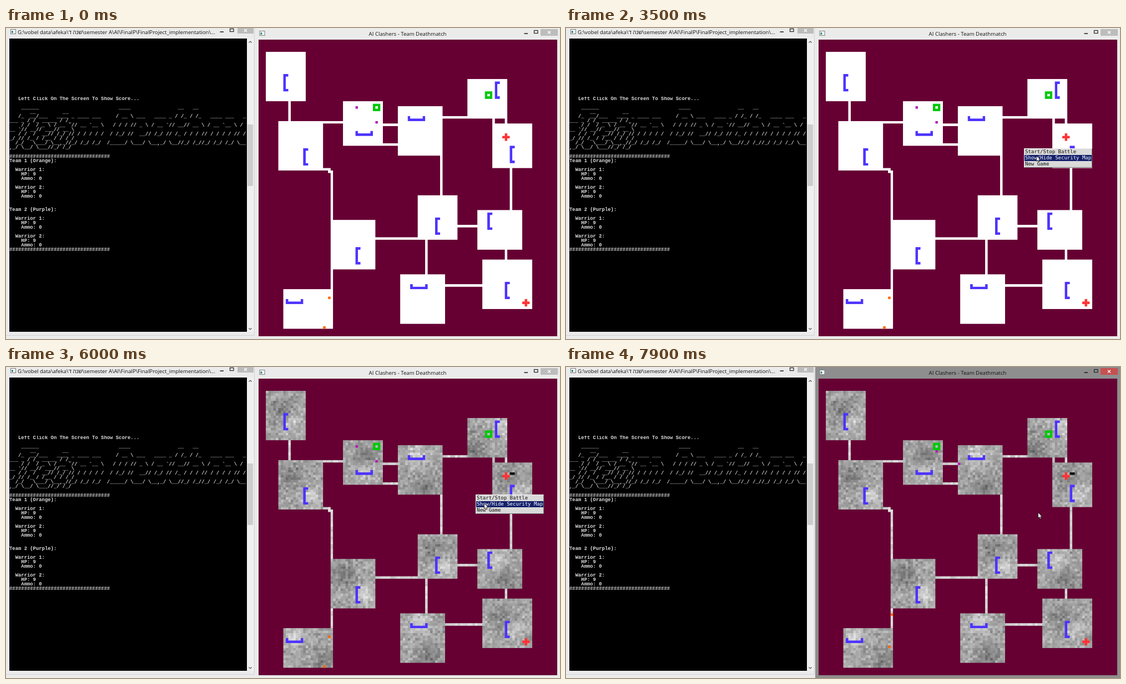
An HTML page with a canvas that plays this animation: 998x561 px, repeating every 8 s.

```html
<!DOCTYPE html>
<html lang="en">
<head>
<meta charset="utf-8">
<title>Team Deathmatch</title>
<style>
  html, body { margin: 0; width: 100%; height: 100%; overflow: hidden; background: #ebebeb; }
  #stage { position: relative; width: 998px; height: 561px; overflow: hidden; }
  #stage > * { position: absolute; }
  #chrome { left: 0; top: 0; }
  #chrome text { font: 9.65px "Open Sans", "Noto Sans", sans-serif; fill: #111; }
  #console {
    left: 6px; top: 124px; width: 428px; margin: 0; overflow: hidden;
    font: bold 8.9px/8px "Liberation Mono", monospace; color: #dcdcdc;
  }
  #map { left: 455px; top: 21px; }
  #menu {
    width: 121px; height: 33px; background: #dadada;
    border: 1px solid #eee; border-right-color: #777; border-bottom-color: #777;
    font: 9px/11px "DejaVu Sans Mono", monospace; color: #111; white-space: pre;
  }
  #menu div { height: 11px; padding-left: 1px; }
  #menu .on { background: #14206c; color: #fff; }
  #cursor { left: 0; top: 0; overflow: visible; }
</style>
</head>
<body>
<div id="stage">
  <svg id="chrome" width="998" height="561">
    <rect width="998" height="561" fill="#ebebeb"/>
    <path d="M0 554.5H447.5V0" fill="none" stroke="#d2d2d2"/>
    <rect x="6" y="19" width="428" height="529"/>
    <rect x="434" y="19" width="12" height="529" fill="#f0f0f0"/>
    <rect x="435" y="174" width="10" height="111" fill="#cdcdcd"/>
    <path d="M437.5 26.5l2.5-2.5 2.5 2.5M437.5 541.5l2.5 2.5 2.5-2.5" fill="none" stroke="#555" stroke-width="1.2"/>
    <text x="21" y="11">G:\vobel data\afeka\שנה ד\semester A\AI\FinalP\FinalProject_implementation\...</text>
    <rect id="frame" x="449" width="549" height="561"/>
    <text x="723.5" y="14" text-anchor="middle">AI Clashers - Team Deathmatch</text>
    <g id="buttons"></g>
  </svg>
  <pre id="console"></pre>
  <canvas id="map" width="538" height="535"></canvas>
  <div id="menu"><div>Start/Stop Battle</div><div>Show/Hide Security Map</div><div>New Game</div></div>
  <svg id="cursor" width="10" height="14">
    <path d="M.5 .5V10.5L2.8 8.4 4.4 12 6 11.3 4.5 7.9H7.5Z" fill="#fff" stroke="#111" stroke-width=".8"/>
  </svg>
</div>
<script>
const $ = id => document.getElementById(id);
const LOOP = 8000;
const FRAME = 100;

// Icon and buttons of a window; `right` is the right edge of its close button
const windowButtons = (left, right, y, w, h) => `
  <rect x="${left}" y="${y + 3.5}" width="9" height="8" fill="#fff" stroke="#777"/>
  <rect x="${left + 1.5}" y="${y + 6}" width="3" height="4" fill="#3c8f8a"/>
  <path d="M${right - 60.5} ${y + 8}h6.5" stroke="#222" stroke-width="1.6"/>
  <rect x="${right - 42.5}" y="${y + 2.5}" width="6.5" height="5" fill="none" stroke="#222" stroke-width="1.2"/>
  <rect class="close" x="${right - w}" y="${y}" width="${w}" height="${h}" fill="#bcbcbc"/>
  <path d="M${right - w / 2 - 2.5} ${y + h / 2 - 2.5}l5 5m0-5l-5 5" stroke="#fff" stroke-width="1.3"/>`;
$('buttons').innerHTML = windowButtons(8.5, 446, -1, 29, 11) + windowButtons(457, 994, 2, 31, 12);
const closeButton = document.querySelectorAll('.close')[1];

// Console text, wrapped at 80 columns
const banner = String.raw`
    ______                           ____                __   __                       __         __
   /_  __/___   ____ _ ____ ___     / __ \ ___   ____ _ / /_ / /_   ____ ___   ____ _ / /_ _____ / /_
    / /  / _ \ / __ '// __ '__ \   / / / // _ \ / __ '// __// __ \ / __ '__ \ / __ '// __// ___// __ \
   / /  /  __// /_/ // / / / / /  / /_/ //  __// /_/ // /_ / / / // / / / / // /_/ // /_ / /__ / / / /
  /_/   \___/ \__,_//_/ /_/ /_/  /_____/ \___/ \__,_/ \__//_/ /_//_/ /_/ /_/ \__,_/ \__/ \___//_/ /_/
`.replaceAll("'", '`').split('\n').slice(1, -1);
const warriorText = n => [`  Warrior ${n}:`, '    HP: 9', '    Ammo: 0'];
const teamText = (n, name) => [`Team ${n} (${name}):`, '', ...warriorText(1), '', ...warriorText(2)];
const rule = '#'.repeat(34);
$('console').textContent = [
  '   Left Click On The Screen To Show Score...', '',
  ...banner.flatMap(s => [s.slice(0, 80), s.slice(80)]), '',
  rule, ...teamText(1, 'Orange'), '', '', ...teamText(2, 'Purple'), rule
].join('\n');

// Map in grid cells. Each room holds one cover, open to the right '[' or upwards 'u'
const room = (x, y, w, h, kind, dx, dy) => ({ x, y, w, h, kind, cx: x + dx, cy: y + dy });
const rooms = {
  A: room(3, 5, 16, 20, '[', 7, 9),
  B: room(8, 33, 18, 20, '[', 10, 11),
  C: room(34, 25, 16, 18, 'u', 5, 12),
  D: room(56, 27, 18, 20, 'u', 4, 4),
  E: room(84, 16, 16, 16, '[', 11, 1),
  F: room(94, 34, 16, 18, '[', 7, 9),
  G: room(64, 63, 16, 18, '[', 7, 9),
  H: room(88, 69, 18, 16, '[', 4, 1),
  I: room(29, 73, 18, 20, '[', 10, 11),
  J: room(10, 101, 20, 16, 'u', 1, 4),
  K: room(57, 95, 18, 20, 'u', 4, 4),
  L: room(90, 89, 20, 20, '[', 9, 9)
};
// Straight corridors: the two rooms and the row or column they share
const links = {
  AB: [12], BC: [33], CD: [34, 42], DE: [31], EF: [94, 99], DG: [73], FH: [101],
  HL: [99], GH: [75], IG: [80], GK: [67], KL: [99], IJ: [29]
};
function corridor(a, b, at) {
  const right = a.x + a.w, bottom = a.y + a.h;
  return b.x >= right
    ? { x: right, y: at, w: b.x - right, h: 1 }
    : { x: at, y: bottom, w: 1, h: b.y - bottom };
}
const corridors = Object.entries(links).flatMap(([[a, b], places]) =>
  places.map(at => corridor(rooms[a], rooms[b], at)));
corridors.push({ x: 26, y: 52, w: 3, h: 1 }, { x: 28, y: 53, w: 1, h: 1 }, { x: 29, y: 53, w: 1, h: 20 });

const CELL = 8;
function block(ctx, color, x, y, w = 1, h = 1) {
  ctx.fillStyle = color;
  ctx.fillRect(x * CELL, y * CELL, w * CELL, h * CELL);
}
function noise(x, y) {
  const n = k => { const s = Math.sin(x * 127.1 + y * 311.7 + k * 74.7) * 43758.5453; return s - Math.floor(s); };
  return n(1) + n(2) + n(3) - 1.5;
}
const glow = (dx, dy, r) => Math.exp(-(dx * dx + dy * dy) / (r * r));

// Cells are light inside the cover and dark at the point mirrored through the room's centre
function roomShade(r, x, y) {
  const lx = r.cx + 3, ly = r.cy + (r.kind === '[' ? 3 : -.5);
  const sx = 2 * r.x + r.w - lx, sy = 2 * r.y + r.h - ly;
  return 164 + 42 * glow(x - lx, y - ly, 4) - 34 * glow(x - sx, y - sy, 5) + 30 * noise(x, y);
}
const grey = v => `rgb(${v} ${v} ${v})`;

function drawMap(secure) {
  const canvas = document.createElement('canvas');
  canvas.width = canvas.height = 120 * CELL;
  const ctx = canvas.getContext('2d');
  block(ctx, '#660033', 0, 0, 120, 120);

  const fillArea = (r, shade) => {
    if (!secure) return block(ctx, '#fff', r.x, r.y, r.w, r.h);
    for (let x = r.x; x < r.x + r.w; x++)
      for (let y = r.y; y < r.y + r.h; y++)
        block(ctx, grey(Math.min(232, shade(r, x, y))), x, y);
  };
  for (const c of corridors) fillArea(c, (r, x, y) => 210 + 20 * noise(x, y));
  for (const r of Object.values(rooms)) {
    fillArea(r, roomShade);
    const blue = '#4c33ff', upright = r.kind === '[';
    const [dx, dy] = upright ? [0, 6] : [6, 0];
    block(ctx, blue, r.cx, r.cy + !upright, dx + 1, dy + 1);
    for (const k of [0, 1]) block(ctx, blue, r.cx + k * dx, r.cy + k * dy, upright ? 2 : 1, 1);
  }
  if (secure) block(ctx, '#111', 101, 38, 2, 1);

  for (const [x, y] of [[46, 26], [91, 21]]) {
    block(ctx, '#00c80a', x, y, 3, 3);
    block(ctx, secure ? '#b8b8b8' : '#fff', x + 1, y + 1);
  }
  for (const [x, y] of [[98, 38], [106, 105]]) {
    block(ctx, '#ff3333', x, y + 1, 3, 1);
    block(ctx, '#ff3333', x + 1, y, 1, 3);
  }
  return canvas;
}
const plainMap = drawMap(false), secureMap = drawMap(true);

// Warriors walk one cell per step along their waypoints
const orange = '#ff6600', purple = '#b31ab3';
const warriors = [
  [orange, [[28, 104], [29, 104], [29, 95]]],
  [orange, [[26, 116], [28, 116], [28, 108]]],
  [purple, [[39, 27], [45, 27], [45, 29], [47, 29]]],
  [purple, [[47, 33], [47, 34], [56, 34]]]
];
const stepsAt = t => t < 6700 ? 0 : Math.floor((t - 6550) / 150) + 1;
function walk([[x, y], ...targets], steps) {
  for (const [tx, ty] of targets)
    for (; steps > 0 && (x !== tx || y !== ty); steps--) {
      x += Math.sign(tx - x);
      y += Math.sign(ty - y);
    }
  return [x, y];
}

// Pointer moves: start, end, destination
const moves = [
  [300, 900, 706, 222], [1000, 1400, 826, 217], [2000, 2400, 837, 223], [3200, 3500, 847, 230],
  [4300, 4600, 859, 250], [5900, 6200, 865, 236], [6600, 7900, 850, 262]
];
function pointerAt(t) {
  let x = 15, y = 0;
  for (const [start, end, tx, ty] of moves) {
    const p = Math.max(0, Math.min(1, (t - start) / (end - start)));
    x += (tx - x) * p;
    y += (ty - y) * p;
  }
  return [x, y];
}

const menus = [
  { from: 1700, to: 3800, x: 825, y: 217 },
  { from: 4300, to: 6400, x: 846, y: 230 }
];
const items = [...$('menu').children];
const view = $('map').getContext('2d');
view.imageSmoothingQuality = 'high';

function render(t) {
  const secure = t >= 3800;
  const menu = menus.find(m => t >= m.from && t < m.to);
  const active = secure && !menu;
  $('frame').setAttribute('fill', active ? '#8e8e8e' : '#ebebeb');
  closeButton.setAttribute('fill', active ? '#c75050' : '#bcbcbc');

  const map = secure ? secureMap : plainMap;
  view.drawImage(map, 0, 0, 538, 535);
  view.save();
  view.translate(-.3, -.3);
  view.scale(538 / map.width, 535.2 / map.height);
  view.drawImage(map, 0, 0);
  for (const [color, path] of warriors) block(view, color, ...walk(path, stepsAt(t)));
  view.restore();

  const [px, py] = pointerAt(t);
  $('cursor').style.display = t < 300 ? 'none' : '';
  $('cursor').style.transform = `translate(${px}px, ${py}px)`;

  $('menu').style.display = menu ? '' : 'none';
  if (menu) {
    $('menu').style.left = menu.x + 'px';
    $('menu').style.top = menu.y + 'px';
    const hover = Math.floor((py - menu.y - 1.5) / 11);
    items.forEach((item, i) => item.classList.toggle('on', i === hover));
  }
}

function tick() {
  render(Math.floor(performance.now() % LOOP / FRAME) * FRAME);
  requestAnimationFrame(tick);
}
tick();
</script>
</body>
</html>
```
